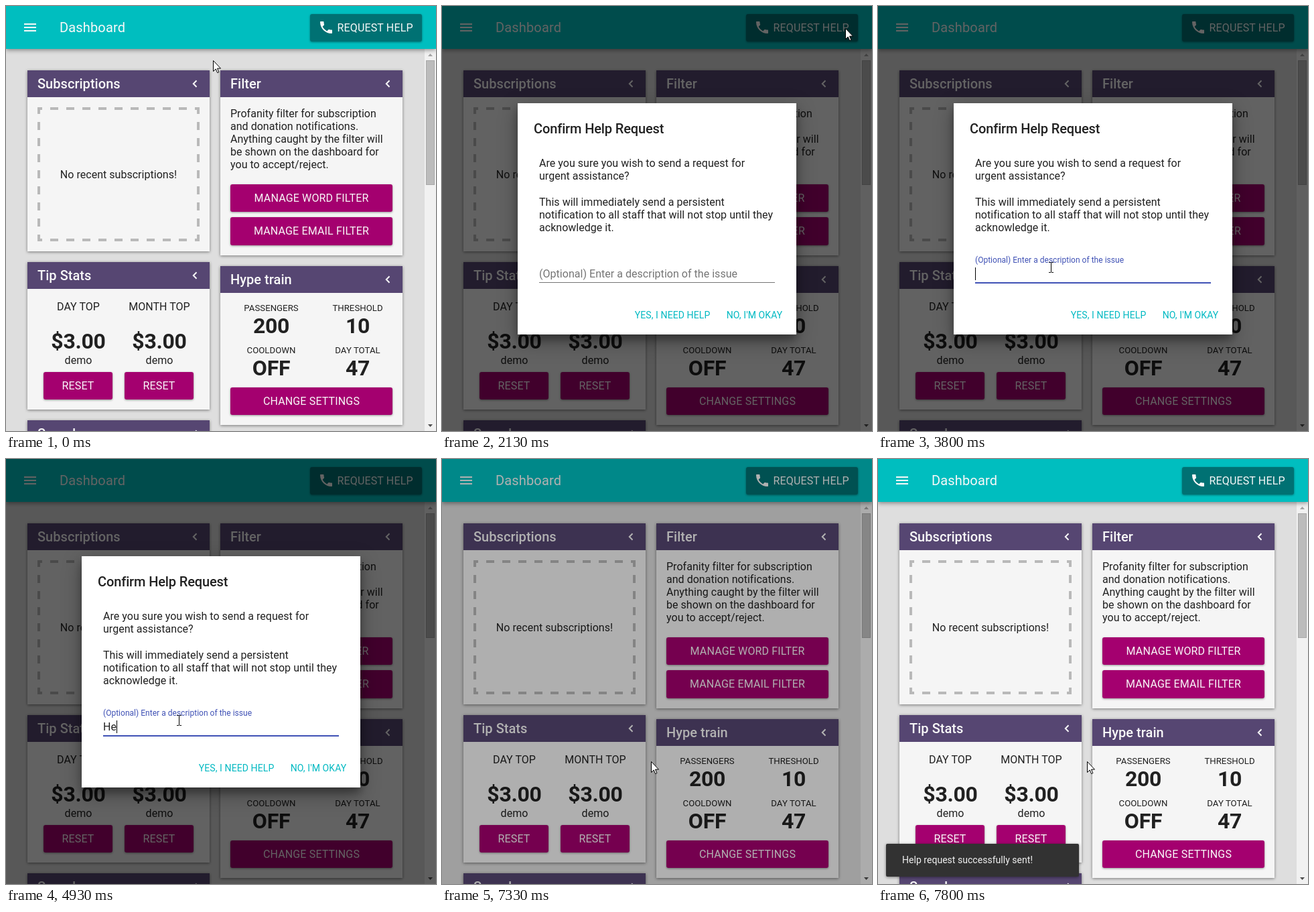
These frames come from a looping animation (642x634 px, 8000 ms). An HTML page:

```html
<!DOCTYPE html>
<html lang="en">
<head>
<meta charset="utf-8">
<title>Dashboard</title>
<style>
  html, body { margin: 0; width: 100%; height: 100%; overflow: hidden; }
  svg { display: block; width: 642px; height: 634px; font: 16px Roboto, sans-serif; letter-spacing: .03px; fill: #212121; }
  text { white-space: pre; }
  .card { filter: drop-shadow(0 1px 2px #0007); }
  .button { filter: drop-shadow(0 1px 1.5px #0006); }
  .bar { filter: drop-shadow(0 2px 3px #0006); }
  .paper { filter: drop-shadow(0 8px 6px #0004) drop-shadow(0 8px 14px #0005); }
  .title { font-size: 20px; font-weight: 500; }
  .heading { letter-spacing: -.13px; }
  .caps { letter-spacing: .15px; }
  .small { font-size: 13.2px; }
  .big { font-size: 32px; font-weight: 700; letter-spacing: -.3px; }
  .action { font-size: 14px; letter-spacing: .1px; fill: #00b9c2; }
  .mid { text-anchor: middle; }
</style>
</head>
<body>
<svg id="stage" viewBox="0 0 642 634"></svg>
<script>
const WHITE = '#f8f8f8', PINK = '#a4006f', INDIGO = '#3f51b5';

const rect = (x, y, w, h, fill, extra = '') =>
  `<rect x="${x}" y="${y}" width="${w}" height="${h}" fill="${fill}" ${extra}/>`;
const text = (x, y, str, cls = '', fill = '', extra = '') =>
  `<text x="${x}" y="${y}" class="${cls}" ${fill && `fill="${fill}"`} ${extra}>${str}</text>`;
const lines = (x, ys, strs) => strs.map((s, i) => text(x, ys[i], s)).join('');
const button = (x, y, w, label, h = 41) =>
  rect(x, y, w, h, PINK, 'rx="3" class="button"') + text(x + w / 2, y + 26, label, 'mid caps', WHITE);
const card = (x, y, h, title) =>
  `<g class="card">${rect(x, y, 272, h, '#f5f5f5')}</g>` + rect(x, y, 272, 40, '#564672') +
  text(x + 15, y + 27, title, 'title', WHITE) +
  `<path d="M${x + 252.5} ${y + 15.3}l-4.7 4.7 4.7 4.7" fill="none" stroke="${WHITE}" stroke-width="2"/>`;
const stat = (x, y, label, value) =>
  text(x, y, label, 'mid small') + text(x, y + 33, value, 'mid big');
const tip = (x, label) =>
  text(x, 454, label, 'mid') + text(x, 511, '$3.00', 'mid big') +
  text(x, 534, 'demo', 'mid') + button(x - 52, 546, 103, 'RESET');

const page = rect(0, 0, 642, 634, '#dedede') +
  card(32, 96, 270, 'Subscriptions') +
  `<g fill="none" stroke="#b9b9b9" stroke-width="4" stroke-dasharray="12">
    <path d="M47 153h242M47 349h242" stroke-dashoffset="5"/>
    <path d="M49 151v200M287 151v200" stroke-dashoffset="2"/>
  </g>` +
  text(168, 257, 'No recent subscriptions!', 'mid') +
  card(320, 96, 276, 'Filter') +
  lines(335, [166, 185, 204, 223, 242], [
    'Profanity filter for subscription', 'and donation notifications.',
    'Anything caught by the filter will', 'be shown on the dashboard for', 'you to accept/reject.']) +
  button(335, 266, 242, 'MANAGE WORD FILTER') +
  button(335, 315, 242, 'MANAGE EMAIL FILTER', 42) +
  card(32, 382, 220, 'Tip Stats') + tip(108, 'DAY TOP') + tip(229, 'MONTH TOP') +
  card(320, 388, 237, 'Hype train') +
  stat(396, 455, 'PASSENGERS', '200') + stat(525, 455, 'THRESHOLD', '10') +
  stat(396, 518, 'COOLDOWN', 'OFF') + stat(525, 518, 'DAY TOTAL', '47') +
  button(335, 569, 242, 'CHANGE SETTINGS') +
  card(32, 618, 100, 'Sounds') +
  rect(625, 64, 17, 570, '#f1f1f1') +
  rect(627.5, 81.5, 12, 185, '#bcbcbc', 'stroke="#a8a8a8"') +
  '<path d="M630 75l3.5-4 3.5 4z" fill="#a3a3a3"/><path d="M630 624l3.5 4 3.5-4z" fill="#505050"/>' +
  rect(0, 0, 642, 64, '#00bebf', 'class="bar"') +
  [26, 31, 36].map(y => rect(27, y, 18, 2, WHITE)).join('') +
  text(80, 39, 'Dashboard', 'caps', WHITE, 'font-size="20"') +
  rect(454, 12, 167, 41, '#007173', 'rx="3" class="button"') +
  `<path transform="translate(466 20)" fill="${WHITE}" d="M6.62 10.79c1.44 2.83 3.76 5.14 6.59 6.59l2.2-2.2c.27-.27.67-.36 1.02-.24 1.12.37 2.33.57 3.57.57.55 0 1 .45 1 1V20c0 .55-.45 1-1 1-9.39 0-17-7.61-17-17 0-.55.45-1 1-1h3.5c.55 0 1 .45 1 1 0 1.25.2 2.45.57 3.57.11.35.03.74-.25 1.02z"/>` +
  text(494.5, 38, 'REQUEST HELP', 'caps', WHITE);

const dialog = rect(113, 145, 416, 345, '#fff', 'class="paper"') +
  text(137, 190, 'Confirm Help Request', 'title heading') +
  lines(145, [240, 259, 298, 317, 336], [
    'Are you sure you wish to send a request for', 'urgent assistance?',
    'This will immediately send a persistent',
    'notification to all staff that will not stop until they', 'acknowledge it.']) +
  '<text id="label">(Optional) Enter a description of the issue</text>' +
  rect(145, 412, 352, 1, '#757575') +
  `<rect id="line" y="412" height="2" fill="${INDIGO}"/>` +
  text(145, 405, '', '', '', 'id="input"') +
  '<rect id="caret" y="390" width="1" height="19" fill="#000"/>' +
  text(344, 466, 'YES, I NEED HELP', 'mid action') + text(466.5, 466, "NO, I'M OKAY", 'mid action');

const toast = rect(12, 574, 288, 49, '#323232', 'rx="2" class="card"') +
  text(36, 603, 'Help request successfully sent!', '', '#f1f1f1', 'font-size="14"');

const cursors = {
  arrow: '<path d="M.5.5v16l3.7-3.5 2.5 5.6 2.2-1-2.4-5.5h5z" fill="#fff" stroke="#000"/>',
  hand: '<path d="M-.9 13V1.8c0-1.8 2.9-1.8 2.9 0V8c0-1.5 3-1.5 3 .5 0-1.5 3-1.5 3 .5 0-1.3 3-1 3 1V15c0 2.5-1.5 3-1.6 7.5H1.2c-.5-3.5-4-6.2-6.2-10-.8-1.8 1-2.6 2.4-1.4z" fill="#fff" stroke="#000" stroke-width="1.2"/><path d="M2.5 15v4M5 15v4M7.5 15v4" stroke="#000"/>',
  beam: '<path d="M-3-7.5H0M1-7.5h3M-3 7.5H0M1 7.5h3M.5-7V7" fill="none" stroke="#000"/>'
};

const stage = document.getElementById('stage');
stage.innerHTML = page + rect(0, 0, 642, 634, '#000', 'id="shade"') +
  `<g id="dialog">${dialog}</g><g id="toast">${toast}</g><g id="cursor">` +
  Object.entries(cursors).map(([k, v]) => `<g id="${k}">${v}</g>`).join('') + '</g>';

const $ = id => document.getElementById(id);
const set = (id, attrs) => { for (const k in attrs) $(id).setAttribute(k, attrs[k]); };
const ramp = (t, a, b) => Math.min(1, Math.max(0, (t - a) / (b - a)));
const mix = (a, b, p) => a + (b - a) * p;

// time, x, y
const path = [[867, 309, 81], [1533, 502, 43], [1733, 602, 33], [2133, 602, 33], [2600, 467, 183],
  [2733, 412, 274], [2800, 390, 300], [3467, 258, 390], [6533, 258, 390], [7000, 312, 451]];
// time, typed text
const keys = [[3600, ''], [4067, 'H'], [4933, 'He'], [5200, 'Hel'], [5400, 'Help'], [5800, 'Help!']];
const FRAME = 1000 / 15, BLINK = 533;

function pointer(t) {
  const i = path.findIndex(p => p[0] > t);
  if (i === 0) return path[0].slice(1);
  if (i < 0) return path[path.length - 1].slice(1);
  const [a, b] = [path[i - 1], path[i]], p = ramp(t, a[0], b[0]);
  return [Math.round(mix(a[1], b[1], p)), Math.round(mix(a[2], b[2], p))];
}

function draw(t) {
  const open = t > 1900 && t < 7300;
  set('shade', { opacity: .6 * (ramp(t, 1867, 2133) - ramp(t, 7133, 7515)) });
  set('dialog', { opacity: ramp(t, 1867, 2133) - ramp(t, 7133, 7333) });

  const focus = ramp(t, 3533, 3800);
  set('label', {
    transform: `translate(145 ${mix(405, 383, focus)}) scale(${mix(1, .75, focus)})`,
    fill: focus ? INDIGO : '#757575'
  });
  const left = mix(258, 145, focus);
  set('line', { x: left, width: mix(258, 497, focus) - left });

  const [since, typed] = keys.filter(k => k[0] <= t + 2).pop() || [Infinity, ''];
  $('input').textContent = typed;
  const blinkOn = Math.floor((t - since + 2) / BLINK) % 2 === 0;
  set('caret', {
    x: Math.round(145 + (typed && $('input').getComputedTextLength())),
    opacity: since < Infinity && blinkOn ? 1 : 0
  });

  const rise = 1 - (1 - ramp(t, 7400, 7733)) ** 2;
  set('toast', { opacity: rise, transform: `translate(0 ${mix(100, 0, rise)})` });

  const [x, y] = pointer(t);
  const overHelp = !open && x > 454 && y < 53;
  const overYes = open && x > 279 && x < 408 && y > 442;
  const overInput = open && x > 145 && x < 497 && y > 386 && y < 414;
  const shape = overHelp || overYes ? 'hand' : overInput ? 'beam' : 'arrow';
  for (const id in cursors) set(id, { display: id === shape ? 'inline' : 'none' });
  set('cursor', { transform: `translate(${x} ${y})` });
}

const start = performance.now();
function tick() {
  const t = (performance.now() - start) % 8000;
  draw(Math.floor((t + 4) / FRAME) * FRAME);
  requestAnimationFrame(tick);
}
tick();
</script>
</body>
</html>
```
